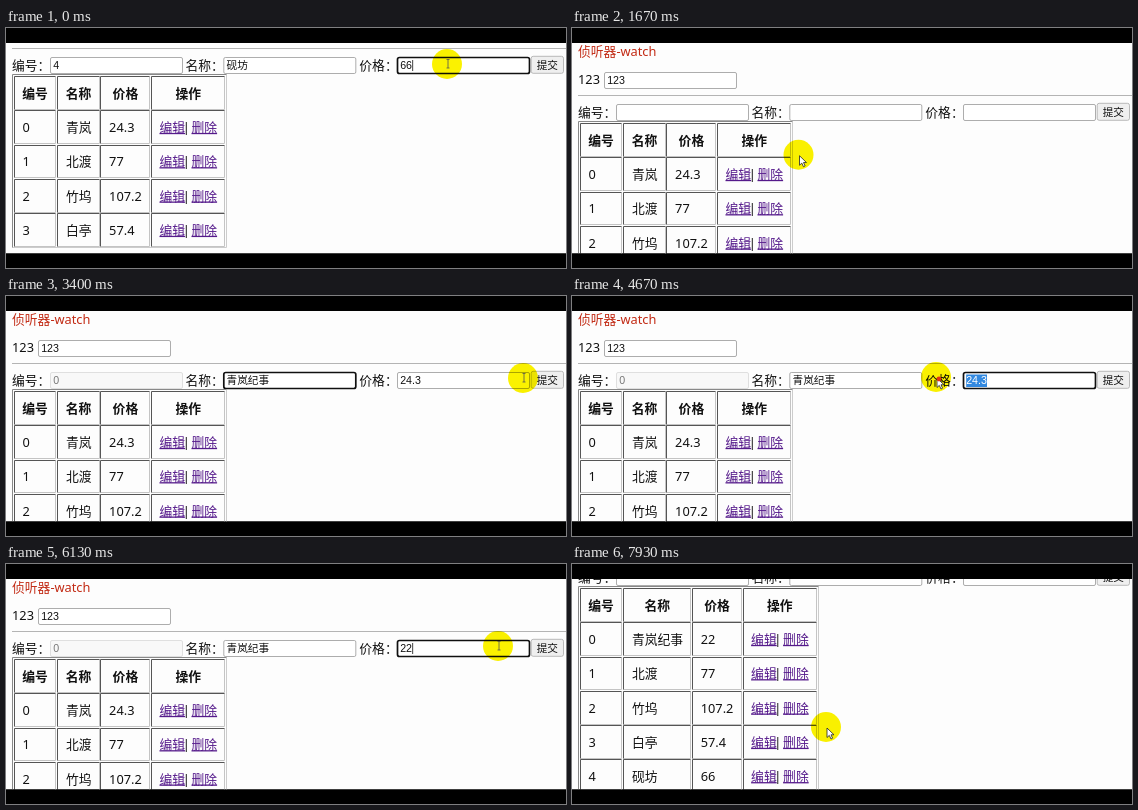
Recreate the animation shown at these times as an HTML page. Size 560x240 px, loop 8 s.

```html
<!DOCTYPE html>
<html lang="zh-CN">
<head>
<meta charset="utf-8">
<style>
  html, body { margin: 0; width: 100%; height: 100%; overflow: hidden; background: #000; }
  svg { display: block; }
  text { font: 12.8px "Noto Sans", "Noto Sans CJK SC", "Noto Sans CJK", sans-serif; fill: #111; white-space: pre; }
  .bold { font-weight: 700; }
  .title { fill: #c22a14; }
  .link { fill: #551a8b; text-decoration: underline; }
  .field { font: 10.67px "Liberation Sans", "Noto Sans CJK SC", "Noto Sans CJK", sans-serif; }
  .muted { fill: #777; }
  .picked { fill: #fff; }
  #halo { fill: #fbf200; mix-blend-mode: multiply; }
</style>
</head>
<body>
<svg width="560" height="240" viewBox="0 0 560 240">
  <rect y="15" width="560" height="210.5" fill="#fdfdfd"/>
  <g id="page"></g>
  <circle id="halo" r="15"/>
  <g id="pointer">
    <path id="beam" d="M-1.5-4.5H1.5M0-4.5V4M-1.5 4H1.5" fill="none" stroke="#555" stroke-width=".8"/>
    <path id="arrow" d="M0 0V9.5L2.3 7.4 4 11 5.6 10.2 4 6.8H7Z" fill="#fff" stroke="#222" stroke-width=".8"/>
    <path id="hand" d="M0 0Q1.5-1 2 1V4Q6 4 7 6 7.5 9 5.5 11.5H1L-2.5 7Q-2 5 0 6.5Z" fill="#fff" stroke="#222" stroke-width=".8"/>
    <circle id="press" cx="2" cy="1" r="2.4" fill="#e33314"/>
  </g>
  <path d="M0 0H560V15H0ZM0 225.5H560V240H0Z"/>
</svg>
<script>
const LOOP = 8000;
const $ = id => document.getElementById(id);

const pointerPath = [
  [0, 441, 36], [100, 441, 36], [650, 543, 38], [1150, 543, 38], [1850, 165, 144],
  [2350, 165, 144], [2680, 300, 84], [2950, 300, 84], [3380, 517, 82], [3700, 517, 82],
  [4350, 364, 81], [5450, 364, 81], [6100, 492, 82], [6200, 492, 82], [6500, 541, 82],
  [6900, 541, 82], [7550, 254, 163], [LOOP, 254, 163]
];
const scrollPath = [[0, 47], [1250, 47], [1600, 0], [7050, 0], [7700, 71], [LOOP, 71]];
const shapes = [[0, 'beam'], [480, 'arrow'], [1800, 'hand'], [2450, 'arrow'], [2600, 'beam'],
  [4280, 'arrow'], [5600, 'beam'], [6380, 'arrow']];
const pressed = [[980, 1080], [2120, 2200], [2680, 2760], [3600, 4720], [6660, 6750]];

// time, field values, focused field, id locked, caret blink origin
const forms = [
  [0, ['4', '砚坊', '66'], 2, false, -150],
  [930, ['4', '砚坊', '66'], 2, false, 930],
  [1050, ['', '', ''], -1, false, 0],
  [2150, ['0', '青岚', '24.3'], -1, true, 0],
  [2700, ['0', '青岚', '24.3'], 1, true, 2700],
  [2850, ['0', '青岚纪事', '24.3'], 1, true, 2850],
  [3600, ['0', '青岚纪事', '24.3'], 2, true, 3600],
  [5200, ['0', '青岚纪事', '2'], 2, true, 5200],
  [5620, ['0', '青岚纪事', '22'], 2, true, 5620],
  [6700, ['', '', ''], -1, false, 0]
];
const books = [['青岚', '24.3'], ['北渡', '77'], ['竹坞', '107.2'], ['白亭', '57.4']];

const stepAt = (steps, t) => steps.filter(s => s[0] <= t).pop();
const crisp = v => Math.floor(v) + .5;

function tween(path, t) {
  const i = Math.max(1, path.findIndex(p => p[0] > t));
  const a = path[i - 1], b = path[i];
  const u = (t - a[0]) / (b[0] - a[0]);
  const e = u * u * (3 - 2 * u);
  return a.slice(1).map((v, k) => v + (b[k + 1] - v) * e);
}

const text = (x, y, s, cls = '', anchor = 'start') =>
  `<text x="${x}" y="${y}" class="${cls}" text-anchor="${anchor}">${s}</text>`;
const box = (x, y, w, h, fill, stroke, sw = .8, rx = 1.5) =>
  `<rect x="${x}" y="${y}" width="${w}" height="${h}" rx="${rx}" fill="${fill}" stroke="${stroke}" stroke-width="${sw}"/>`;
const line = (d, color, w = 1) => `<path d="${d}" fill="none" stroke="${color}" stroke-width="${w}"/>`;

function bevel(x, y, w, h, dark, light) {
  const [l, t, r, b] = [x, y, x + w, y + h].map(crisp);
  return line(`M${r} ${t}V${b}H${l}`, light) + line(`M${l} ${b}V${t}H${r}`, dark);
}

function input(x, y, value, { focus, locked, caret, selectFrom = 4 } = {}) {
  let out = focus
    ? box(x + .5, y + .5, 132, 16, '#fff', '#101010', 1.7, 2)
    : box(x + .5, y + .5, 132, 16, locked ? '#f8f8f8' : '#fff', locked ? '#d8d8d8' : '#999');
  const left = x + 3.2, baseline = y + 12.3;
  out += text(left, baseline, value, 'field' + (locked ? ' muted' : ''));
  if (selectFrom < 4) {
    const offset = [0, 5.9, 11.9, 14.8][selectFrom];
    out += `<rect x="${left + offset}" y="${y + 2.5}" width="${20.8 - offset}" height="12.5" fill="#3389e0"/>`
      + text(left + offset, baseline, value.slice(selectFrom), 'field picked');
  } else if (caret) {
    const width = [...value].reduce((n, c) => n + (c > '~' ? 10.67 : c === '.' ? 2.97 : 5.93), 0);
    out += line(`M${left + width + .6} ${y + 3}v11`, '#111', .8);
  }
  return out;
}

function table(t) {
  const rows = books.map(b => [...b]);
  if (t >= 1050) rows.push(['砚坊', '66']);
  const renamed = t >= 6700;
  if (renamed) rows[0] = ['青岚纪事', '22'];
  const shift = renamed ? 25.6 : 0, pitch = 34.3, top = 95.4;
  const cols = [[8.2, 41.6], [51.7, 41.6 + shift], [94.9 + shift, 49], [145.5 + shift, 73.4]];
  let out = bevel(6.5, 93.8, 214 + shift, pitch * (rows.length + 1) + 1.5, '#888', '#ccc');
  for (let r = 0; r <= rows.length; r++) {
    const y = top + r * pitch, base = y + 21.2;
    cols.forEach(([x, w]) => out += bevel(x, y, w, 32.7, '#555', '#c4c4c4'));
    if (!r) {
      ['编号', '名称', '价格', '操作'].forEach((s, i) =>
        out += text(cols[i][0] + cols[i][1] / 2, base, s, 'bold', 'middle'));
      continue;
    }
    [r - 1, ...rows[r - 1]].forEach((s, i) => out += text(cols[i][0] + 8.2, base, s));
    const x = cols[3][0] + 8;
    out += text(x, base, '编辑', 'link') + text(x + 23.2, base, '|')
      + text(x + 32, base, '删除', 'link');
  }
  return out;
}

function pageMarkup(t, pointerX) {
  const [, values, focus, locked, origin] = stepAt(forms, t);
  const caret = (t - origin) % 1060 < 530;
  let selectFrom = 4;
  if (t >= 3700 && t < 5200) selectFrom = [394, 400, 406, 409].filter(x => x < pointerX).length;
  let out = text(6, 27.6, '侦听器-watch', 'title') + text(6, 56.2, '123') + input(32, 44, '123')
    + line('M6 67.5H560', '#b4b4b4');
  ['编号：', '名称：', '价格：'].forEach((label, i) => {
    const x = [44, 217.3, 391][i];
    out += text([6, 179.5, 353.3][i], 88.6, label) + input(x, 76, values[i], {
      focus: focus === i, locked: locked && !i, caret: caret && focus === i,
      selectFrom: i === 2 ? selectFrom : 4
    });
  });
  return out + box(525.2, 75.3, 32.3, 17, '#efefef', '#aaa', .8, 2)
    + text(541.3, 88, '提交', 'field', 'middle') + table(t);
}

let shown = '';
function draw(t) {
  const [x, y] = tween(pointerPath, t);
  const markup = pageMarkup(t, x);
  if (markup !== shown) $('page').innerHTML = shown = markup;
  $('page').setAttribute('transform', `translate(0 ${-Math.round(tween(scrollPath, t)[0])})`);
  $('halo').setAttribute('transform', `translate(${x} ${y})`);
  const shape = stepAt(shapes, t)[1];
  const [dx, dy] = { beam: [1, 0], arrow: [1, 1], hand: [0, 1] }[shape];
  $('pointer').setAttribute('transform', `translate(${x + dx} ${y + dy})`);
  const down = pressed.some(([a, b]) => t >= a && t < b);
  for (const id of ['beam', 'arrow', 'hand']) $(id).style.display = id === shape ? '' : 'none';
  $('press').style.display = down ? '' : 'none';
}

const start = performance.now();
function tick() {
  draw((performance.now() - start) % LOOP);
  requestAnimationFrame(tick);
}
tick();
</script>
</body>
</html>
```
